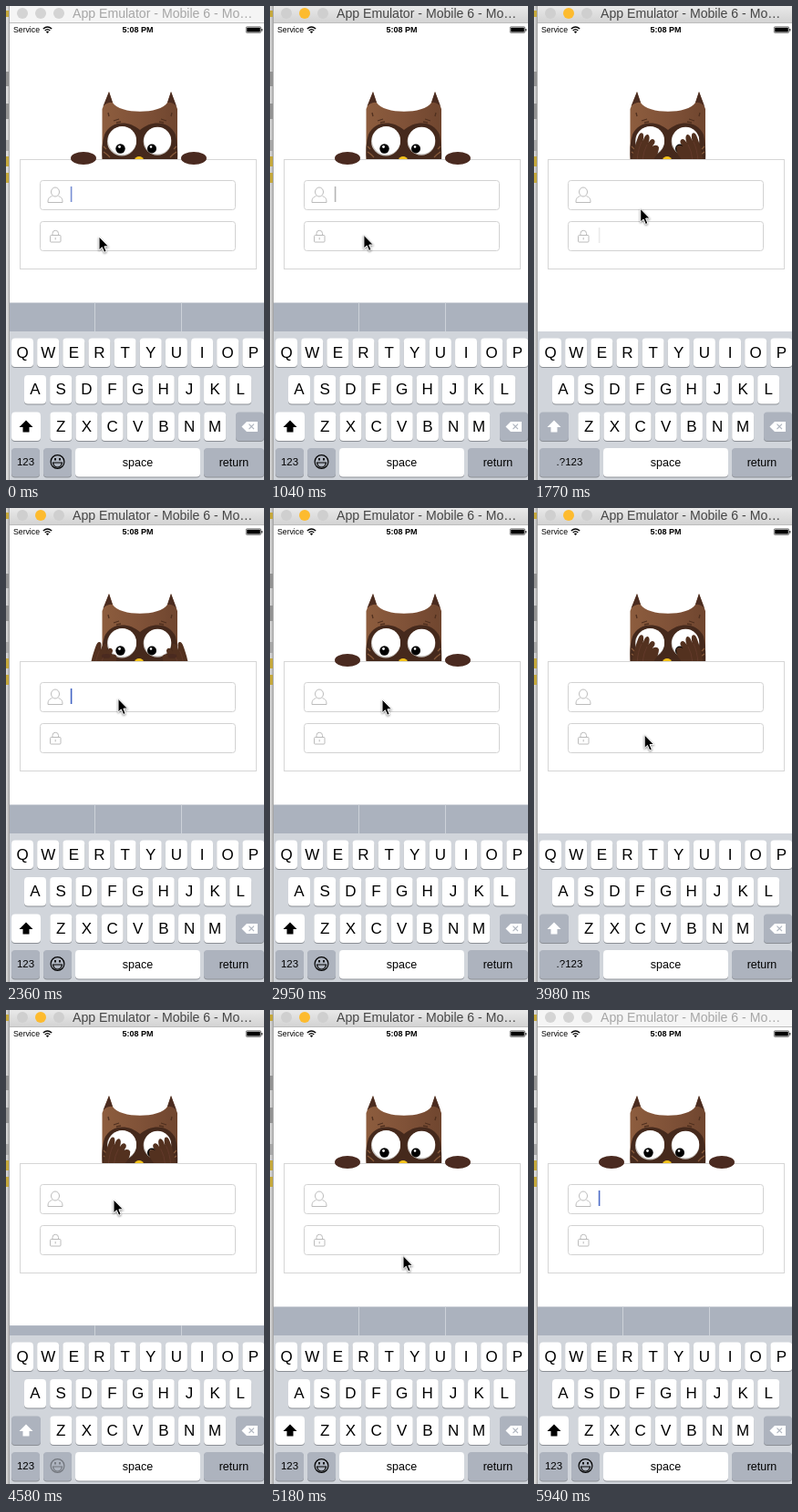
Recreate the animation shown at these times as an HTML page. Size 283 px wide and 520 px high, loop 5.97 s.

```html
<!DOCTYPE html>
<html lang="en">
<head>
<meta charset="utf-8">
<title>Owl login</title>
<style>
html, body { margin: 0; width: 100%; height: 100%; overflow: hidden; background: #fff; }
svg { display: block; width: 283px; height: 520px; }
text { font-family: "Liberation Sans", Arial, sans-serif; }
.mid { text-anchor: middle; }
.line { fill: none; stroke: #bcbcbc; stroke-width: 1; }
.field { fill: #fff; stroke: #d2d2d2; }
.off .light { fill: #d4d4d4; }
.off #title { fill: #a6a6a6; }
.off #bar { fill: #f5f5f5; }
.off #shade { opacity: .55; }
#mouse { filter: drop-shadow(0 1px 1px #0007); }
</style>
</head>
<body>
<svg id="stage" viewBox="0 0 283 520">
  <defs>
    <linearGradient id="chrome" x2="0" y2="1"><stop stop-color="#e9e9e9"/><stop offset="1" stop-color="#d3d3d3"/></linearGradient>
    <linearGradient id="fur"><stop stop-color="#8d5d3e"/><stop offset=".5" stop-color="#805238"/><stop offset="1" stop-color="#70462f"/></linearGradient>
    <linearGradient id="side"><stop stop-color="#dedede"/><stop offset="1" stop-color="#a9a9a9"/></linearGradient>
    <g id="arm">
      <path d="M106 182C107 165 111 152 114 144Q116 138 119 139.500Q121 141 119.500 148Q122 140 125 141Q128 143 125.500 150Q129 144 132 147Q134 150 129.500 154Q135 151 137 155Q137 162 132 167L131 182Z" fill="#53311f"/>
      <path d="M113 170Q114 157 118 149M119 170Q120 159 124 152" fill="none" stroke="#62392a"/>
    </g>
  </defs>

  <rect width="283" height="520" fill="#fff"/>
  <!-- desktop behind the window -->
  <g>
    <rect width="4" height="520" fill="#e4e4e4"/>
    <rect id="shade" width="4" height="520" fill="url(#side)"/>
    <path d="M0 72h4v16h-4zM0 107h4v17h-4z" fill="#949494"/>
    <path d="M0 147h4v12h-4z" fill="#a8a8a8"/>
    <path d="M0 5h4v7h-4zM0 165h4v11h-4zM0 183h4v11h-4z" fill="#c6a93c"/>
    <path d="M3.5 0V520" stroke="#a5a5a5"/>
  </g>
  <!-- title bar -->
  <g>
    <rect id="bar" x="4" width="279" height="18" fill="url(#chrome)"/>
    <path d="M4 18.5H283" stroke="#bdbdbd"/>
    <circle class="light" cx="18" cy="8" r="6" fill="#cfcfcf"/>
    <circle class="light" cx="38" cy="8" r="6" fill="#fdbb2f"/>
    <circle class="light" cx="58" cy="8" r="6" fill="#cfcfcf"/>
    <text id="title" x="73" y="13" font-size="14.1" fill="#454545">App Emulator - Mobile 6 - Mo…</text>
  </g>
  <!-- status bar -->
  <g>
    <text x="8" y="29.2" font-size="8.7">Service</text>
    <path d="M40.8 25.1Q45.5 20.8 50.2 25.1M42.7 27Q45.5 24.3 48.3 27" fill="none" stroke="#000" stroke-width="1.3"/>
    <path d="M43.9 28.2Q45.5 26.8 47.1 28.2L45.5 30Z"/>
    <text class="mid" x="144.5" y="29.2" font-size="9" font-weight="bold">5:08 PM</text>
    <rect x="263.3" y="22.8" width="16.4" height="6.600" rx="1" fill="none" stroke="#000" stroke-width=".5"/>
    <rect x="264.2" y="23.7" width="14.600" height="4.800"/>
    <rect x="280.3" y="25" width="1" height="2.500"/>
  </g>

  <!-- owl -->
  <g>
    <path d="M105.500 172V113L113 94L117 106C125 119 169 119 177 106L181 94L188 113V172Z" fill="url(#fur)"/>
    <path d="M106.500 110L113 94L117 106Q112 105 106.500 110ZM187 110L181 94L177 106Q182 105 187 110Z" fill="#4b2c20"/>
    <path d="M106 172Q104 153 108 141C114 127 133 124 147 136C161 124 180 127 186 141Q189 153 188 172Z" fill="#45291c"/>
    <path d="M118 126l6-2M121 128l5-1M176 126l-6-2M173 128l-5-1M112 117l1 4M182 117l-1 4" fill="none" stroke="#50301f" stroke-width="1.3"/>
    <path d="M107 154l3 3M107 160l4 3M111 163l3 3M187 154l-3 3M187 160l-4 3M183 163l-3 3" fill="none" stroke="#875939" stroke-width="1.2"/>
    <circle cx="127" cy="148.500" r="16" fill="#c9c5c1"/>
    <circle cx="127.500" cy="147.500" r="15.500" fill="#fff"/>
    <circle cx="166" cy="148.500" r="15.300" fill="#c9c5c1"/>
    <circle cx="166.300" cy="147.500" r="14.800" fill="#fff"/>
    <circle cx="125.500" cy="156.500" r="5.200"/>
    <circle cx="160" cy="156.500" r="5"/>
    <circle cx="124.500" cy="154.500" r="1.400" fill="#fff"/>
    <circle cx="159" cy="154.500" r="1.300" fill="#fff"/>
    <ellipse cx="146" cy="169" rx="5" ry="4" fill="#f2c21c"/>
    <g id="armL"><use href="#arm"/></g>
    <g id="armR"><use href="#arm" transform="translate(293 0) scale(-1 1)"/></g>
  </g>

  <!-- form -->
  <g>
    <rect x="15.500" y="168.500" width="259" height="120" fill="#fff" stroke="#d6d6d6"/>
    <rect class="field" x="37.500" y="191.500" width="214" height="32" rx="3"/>
    <rect class="field" x="37.500" y="236.500" width="214" height="32" rx="3"/>
    <g class="line">
      <ellipse cx="54" cy="204" rx="4.500" ry="5"/>
      <path d="M50.500 208.500C47 210 46 211 46 215.500H62C62 211 61 210 57.500 208.500"/>
      <rect x="48.500" y="251.500" width="11.500" height="7.500" rx="1"/>
      <path d="M51 251.500V249.500a3.200 3.200 0 0 1 6.500 0V251.500M54.200 254v2.500"/>
    </g>
    <ellipse id="handL" fill="#4a2a20"/>
    <ellipse id="handR" fill="#4a2a20"/>
    <rect id="caret" x="70.800" width="1.600" height="17"/>
  </g>

  <!-- keyboard -->
  <g id="hints">
    <rect x="4" y="325.500" width="279" height="40" fill="#abb2be"/>
    <path d="M97.500 325.500V365M192.500 325.500V365" stroke="#cdd2d9"/>
  </g>
  <rect x="4" y="357" width="279" height="163" fill="#d1d5db"/>
  <g id="keys"></g>
  <path id="shift" d="M22 454.500L29.500 462H25.500V467.500H18.500V462H14.500Z"/>
  <path d="M258.500 461.500L264 456H276V467H264Z" fill="#fff"/>
  <path d="M266.500 458.700l5.500 5.500m0-5.500l-5.500 5.500" stroke="#adb3be" stroke-width="1.200"/>
  <g id="smile" fill="none" stroke="#000" stroke-width="1.200">
    <circle cx="56.500" cy="500" r="7.400"/>
    <path d="M51.500 501H61.500Q60.500 506 56.500 506T51.500 501Z"/>
    <path d="M54 496v2.500M59 496v2.500" stroke-width="1.700"/>
  </g>

  <path id="mouse" d="M0 0V14.800L3.300 11.700L5.700 17.300L8.200 16.200L5.900 10.800H10.500Z" stroke="#fff"/>
</svg>
<script>
const LOOP = 5970, STEP = 148, GREY = "#adb3be";
const $ = id => document.getElementById(id);

function key(x, y, w, label = "", size = 17, fill = "#fff") {
  const box = dy => `<rect x="${x}" y="${y + dy}" width="${w}" height="31.5" rx="4" `;
  return `<g>${box(1)}fill="#8b8f95"/>${box(0)}fill="${fill}"/>` +
    `<text class="mid" x="${x + w / 2}" y="${y + 15.4 + size * .35}" font-size="${size}">${label}</text></g>`;
}
const row = (letters, x, y) => [...letters].map((c, i) => key(x + i * 28.15, y, 24, c)).join("");

$("keys").innerHTML =
  row("QWERTYUIOP", 6, 364.5) + row("ASDFGHJKL", 20, 405) + row("ZXCVBNM", 48.3, 445.5) +
  `<g id="shiftOn">${key(6, 445.5, 32)}</g><g id="shiftOff">${key(6, 445.5, 32, "", 17, GREY)}</g>` +
  key(252, 445.5, 31, "", 17, GREY) +
  `<g id="rowText">${key(6, 485, 31, "123", 11.5, GREY)}${key(41, 485, 31, "", 12, GREY)}</g>` +
  `<g id="rowPass">${key(6, 485, 66, ".?123", 11.5, GREY)}</g>` +
  key(76, 485, 137, "space", 12.5) + key(217, 485, 66, "return", 12.5, GREY);

// Into the password field and back out, in ms
const visits = [[1240, 2170], [3160, 4550]];

// Pointer stops: ms, x, y
const stops = [[0, 102, 253], [1300, 103, 251], [2060, 123, 209], [3000, 123, 210], [3390, 122, 247],
  [4200, 121, 249], [4570, 118, 208], [5030, 118, 208], [5330, 174, 331]];

const clamp = v => Math.min(1, Math.max(0, v));
const ease = v => (v = clamp(v), v * v * (3 - 2 * v));
const blink = age => age < 100 ? 0 : clamp(.5 + .8 * Math.cos((age - 215) / 1000 * 2 * Math.PI));

function pointerAt(t) {
  let [, x, y] = stops[0];
  for (let i = 1; i < stops.length; i++) {
    const [from] = stops[i - 1], [to, nx, ny] = stops[i];
    const u = ease((t - from) / (to - from));
    x += (nx - x) * u;
    y += (ny - y) * u;
  }
  return [x, y];
}

const show = (id, on) => $(id).style.display = on ? "" : "none";
const move = (id, x, y) => $(id).setAttribute("transform", `translate(${x} ${y})`);
const set = (id, attrs) => Object.entries(attrs).forEach(([k, v]) => $(id).setAttribute(k, v));

function hand(id, x, size) {
  const rx = 14 * size, ry = 7 * size;
  set(id, { cx: x + rx, cy: 160 + ry, rx, ry });
}

function draw(ms) {
  // The screen refreshes in coarse steps
  const t = Math.floor((ms + 15) / STEP) * STEP;
  let cover = 0, hints = 1;
  for (const [enter, leave] of visits) {
    cover += ease((t - enter) / 500) - ease((t - leave) / 500);
    hints += clamp((t - leave) / 110) - clamp((t - enter) / 110);
  }
  const [enter, leave] = visits.filter(v => v[0] <= t).pop() || visits[1].map(v => v - LOOP);
  const secret = t < leave, lower = t < leave + 100;
  const rest = 1 - cover;

  $("stage").classList.toggle("off", t < 1030 || t > 5770);
  move("armL", -45 * rest, 22.5 * rest);
  move("armR", 45 * rest, 22.5 * rest);
  show("armL", cover > .02);
  show("armR", cover > .02);
  hand("handL", 71 + 52 * cover, rest);
  hand("handR", 192 - 22 * cover, rest);

  move("hints", 0, 31.5 * (1 - hints));
  show("hints", hints > .01);
  show("rowPass", secret);
  show("rowText", !secret);
  $("smile").style.opacity = secret ? 0 : hints;
  show("shiftOff", lower);
  show("shiftOn", !lower);
  $("shift").style.fill = lower ? "#fff" : "#000";

  const glow = blink(t - (secret ? enter : leave));
  set("caret", { y: secret ? 243 : 198, opacity: glow, fill: glow > .55 ? "#4364c4" : "#777" });
  move("mouse", ...pointerAt(t));
  show("mouse", t < 5770);
}

const start = performance.now();
function tick() {
  draw((performance.now() - start) % LOOP);
  requestAnimationFrame(tick);
}
tick();
</script>
</body>
</html>
```
